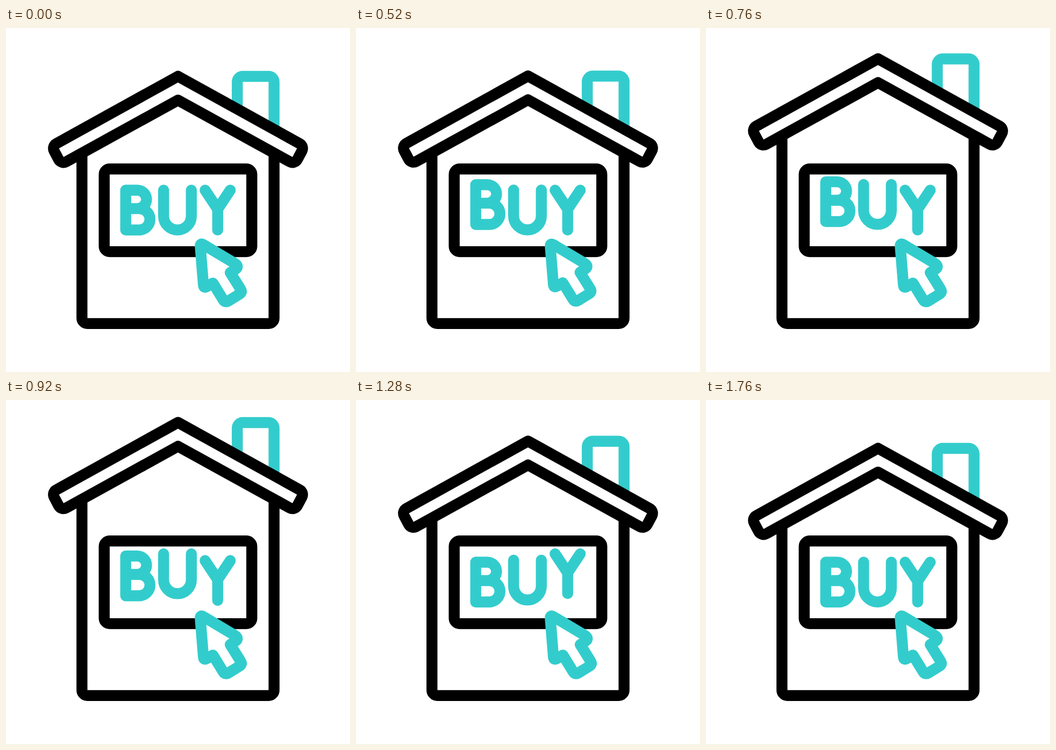
Animation, 640 px wide and 640 px high, one loop 1960 ms. Source, as an HTML page:

```html
<!DOCTYPE html>
<html lang="en">
<head>
<meta charset="utf-8">
<title>Buy a house</title>
<style>
  html, body { margin: 0; width: 100%; height: 100%; overflow: hidden; background: #fff; }
  svg { display: block; width: 100vw; height: 100vh; }
</style>
</head>
<body>
<svg viewBox="0 0 640 640" fill="none" stroke="#000" stroke-width="20.4" stroke-linecap="round" stroke-linejoin="round">
  <path id="walls" stroke-linecap="butt"/>
  <g id="roof">
    <path stroke="#33cccc" stroke-linecap="butt" d="M430.3 156V100.2a10.2 10.2 0 0 1 10.2-10.2H488.5a10.2 10.2 0 0 1 10.2 10.2V190"/>
    <path fill="#fff" d="M320 89.8L93.6 215.1A10.2 10.2 0 0 0 89.6 228.9L98.1 244.9A10.2 10.2 0 0 0 111.9 248.9L320 134.2L528.1 248.9A10.2 10.2 0 0 0 541.9 244.9L550.4 228.9A10.2 10.2 0 0 0 546.4 215.1Z"/>
  </g>
  <rect x="182.7" y="262.2" width="274.6" height="153.9" rx="10.2"/>
  <g stroke="#33cccc">
    <path id="b" d="M222.7 301.7H244.3a17.1 17.1 0 0 1 0 34.3H222.7H248a19.85 19.85 0 0 1 0 39.7H222.7Z"/>
    <path id="u" d="M293.2 301.7V349.9a25.8 25.8 0 0 0 51.6 0V301.7"/>
    <path id="y" d="M370.4 301.7L393.8 337L417.2 301.7M393.8 337V375.7"/>
    <path id="cursor" fill="#fff" d="M361.5 407Q360.7 399 368 403.4L425 437.6Q435.5 443.9 425.5 450L417.2 455L436.5 486Q440.3 491.5 434 495.4L413.5 508Q407.7 511.6 404 505.6L385 474.6L374.5 480.8Q367.8 484.8 367.3 478Z"/>
  </g>
</svg>
<script>
const LOOP = 1960, HOLD = 120, STEP = 40, LAST = 42;
const part = id => document.getElementById(id);

const ease = u => u < 0.5 ? 0.5 * (2 * u) ** 2.4 : 1 - 0.5 * (2 - 2 * u) ** 2.4;

// Rises from 0 to 1 and falls back, each way taking `half` steps.
const pulse = (step, start, half) =>
  ease(Math.max(0, 1 - Math.abs(step - start - half) / half));

const shift = (id, y) => part(id).setAttribute('transform', `translate(0 ${-y})`);

function draw(time) {
  const t = time % LOOP;
  const step = t < HOLD ? 0 : Math.min(LAST, Math.floor((t - HOLD) / STEP + 0.001) + 1);

  const lift = 48.6 * pulse(step, 9.7, 12.6);
  shift('roof', lift);
  part('walls').setAttribute('d',
    `M141.3 ${233 - lift}V539.7a10.2 10.2 0 0 0 10.2 10.2H488.5a10.2 10.2 0 0 0 10.2 -10.2V${233 - lift}`);

  shift('b', 15.6 * pulse(step, 4, 12.3));
  shift('u', 15.6 * pulse(step, 9.9, 12.3));
  shift('y', 15.6 * pulse(step, 16.9, 12.4));

  const scale = 1 - 0.1 * pulse(step, 0, 6.25);
  part('cursor').setAttribute('transform',
    `translate(361 400) scale(${scale}) translate(-361 -400)`);
}

const begin = performance.now();
function tick() {
  draw(performance.now() - begin);
  requestAnimationFrame(tick);
}
tick();
</script>
</body>
</html>
```
